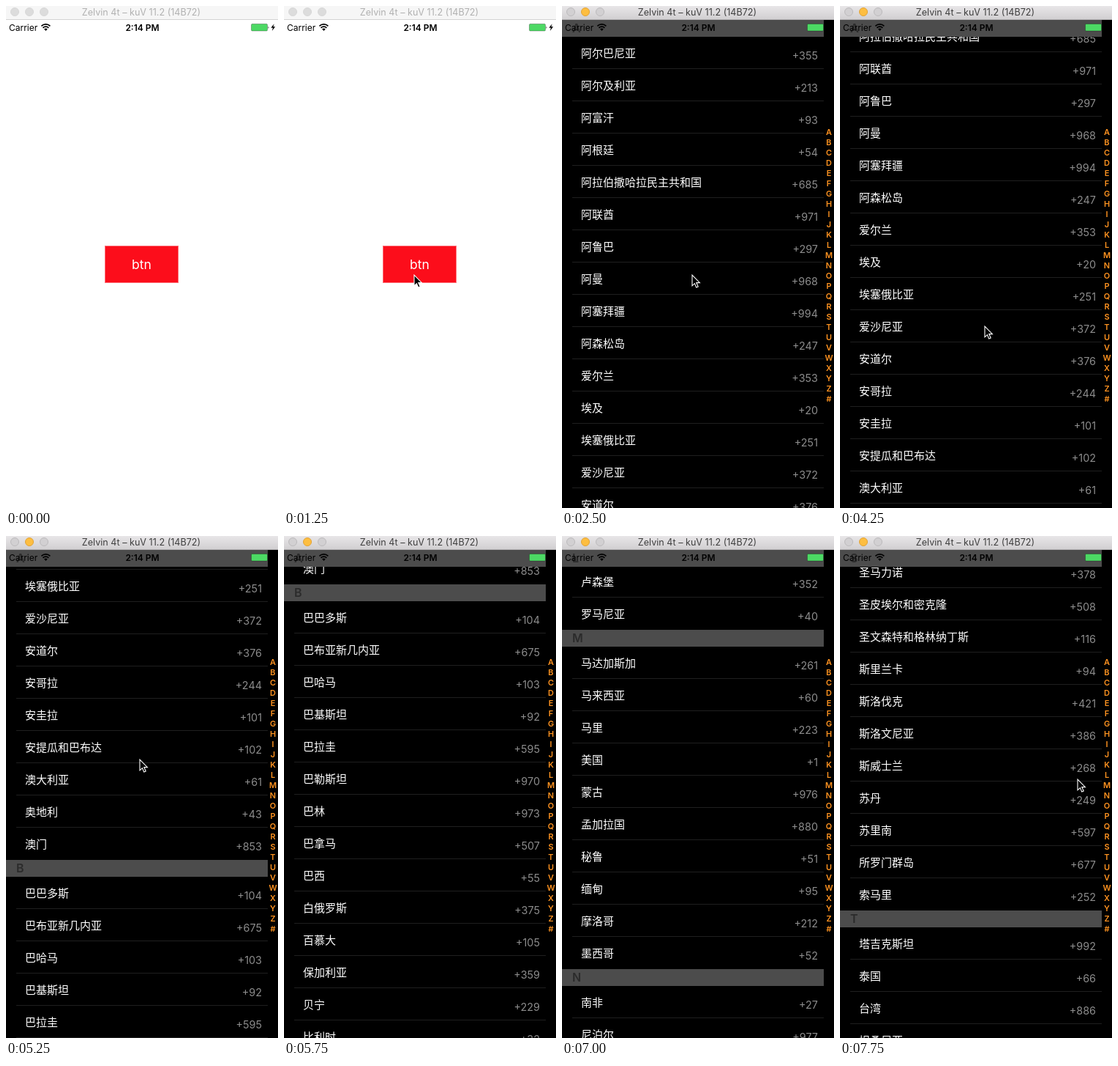
Recreate the animation shown at these times as an HTML page. Size 372 by 685 pixels, loop 8 s.

```html
<!DOCTYPE html>
<html lang="zh-CN">
<head>
<meta charset="utf-8">
<title>Country codes</title>
<style>
  html, body { margin: 0; width: 100%; height: 100%; overflow: hidden; background: #fff; }
  #stage { position: relative; width: 372px; height: 685px; overflow: hidden; background: #fff;
    font-family: Inter, Roboto, sans-serif; }
  #bar { position: absolute; inset: 0 0 auto; height: 18px; background: #f6f6f6; border-bottom: 1px solid #d3d3d3;
    color: #b1b1b1; font-size: 12.6px; line-height: 17px; text-align: center; white-space: nowrap; text-indent: -2px; }
  #bar i { position: absolute; top: 2px; width: 12px; height: 12px; border-radius: 50%; background: #dcdcdc;
    box-sizing: border-box; border: 1px solid #d8d8d8; }
  #bar.on { background: linear-gradient(#e8e6e8, #d1cfd1); border-color: #b2b0b2; color: #3f3f3f; }
  #bar.on i { background: #d2d0d2; border-color: #bcbabc; }
  #bar.on i.min { background: #fdbe41; border-color: #e2a336; }
  #btn { position: absolute; left: 135px; top: 327px; width: 99px; height: 49px; background: #fc0d1b padding-box;
    border: 1px solid #fc0d1b99; color: #fff; font-size: 17.5px; line-height: 49px; text-align: center; }
  #sheet { position: absolute; left: 0; top: 19px; width: 372px; height: 666px; background: #000; }
  #list { position: absolute; inset: 0; overflow: hidden; }
  .head { position: sticky; top: 0; z-index: 1; width: 344px; height: 23px; padding-left: 14px; background: #4c4c4c;
    color: #2b2b2b; font-size: 16px; font-weight: 600; line-height: 23px; }
  .row { position: relative; height: 43px; margin-left: 14px; width: 344px; border-bottom: 1px solid #1f1f1f;
    color: #fff; font: 15px/43px "Noto Sans CJK SC", "Noto Sans CJK", sans-serif; white-space: nowrap; }
  .row span { position: absolute; left: 12px; top: 0; }
  .row b { position: absolute; right: 8px; top: 4px; color: #8c8c8c; font: 14.4px/43px Inter, sans-serif; }
  .section .row:last-child { border-color: #000; }
  #index { position: absolute; left: 358px; top: 146px; width: 14px; color: #ff9320;
    font-size: 11px; font-weight: 600; line-height: 14px; text-align: center; }
  svg { position: absolute; left: 0; top: 0; overflow: visible; }
</style>
</head>
<body>
<div id="stage">
  <div id="btn">btn</div>
  <div id="sheet"><div id="list"></div><div id="index"></div></div>
  <svg width="372" height="42" font-size="12">
    <text x="4" y="33.5">Carrier</text>
    <text x="186.5" y="33.5" font-weight="600" text-anchor="middle">2:14 PM</text>
    <g fill="none" stroke="#000" stroke-width="1.7">
      <path d="M48.4 27.3a8.6 8.6 0 0 1 12 0M50.5 29.8a5.6 5.6 0 0 1 7.8 0"/>
    </g>
    <path d="M54.4 34l-2.3-2.5a3.4 3.4 0 0 1 4.6 0z"/>
    <rect x="335.5" y="24.5" width="22" height="9.5" rx="1.2" fill="#4cd964" stroke="#000" stroke-opacity=".35" stroke-width=".8"/>
    <path d="M358.6 27.4q1.7 1.8 0 3.8z"/>
    <path d="M366.6 24.2l-4.2 5.6h2.6l-1.2 4.2 4.4-5.8h-2.7z"/>
  </svg>
  <div id="bar"><i style="left:6px"></i><i class="min" style="left:26px"></i><i style="left:46px"></i>Zelvin 4t – kuV 11.2 (14B72)</div>
  <svg id="cursor" width="13" height="20">
    <path d="M0 0V14.8L3.4 11.6 5.7 17 8.2 15.9 5.8 10.6H10.4Z" stroke="#fff" stroke-width="1.1"/>
  </svg>
</div>
<script>
const data = `
A 阿尔巴尼亚355 阿尔及利亚213 阿富汗93 阿根廷54 阿拉伯撒哈拉民主共和国685 阿联酋971 阿鲁巴297 阿曼968 阿塞拜疆994 阿森松岛247 爱尔兰353 埃及20 埃塞俄比亚251 爱沙尼亚372 安道尔376 安哥拉244 安圭拉101 安提瓜和巴布达102 澳大利亚61 奥地利43 澳门853
B 巴巴多斯104 巴布亚新几内亚675 巴哈马103 巴基斯坦92 巴拉圭595 巴勒斯坦970 巴林973 巴拿马507 巴西55 白俄罗斯375 百慕大105 保加利亚359 贝宁229 比利时32 冰岛354 波多黎各107 波兰48 波黑387 玻利维亚591 伯利兹501 博茨瓦纳267 不丹975 布基纳法索226 布隆迪257
C 朝鲜850 赤道几内亚240
D 丹麦45 德国49 东帝汶670 多哥228 多米尼加108
E 俄罗斯7 厄瓜多尔593 厄立特里亚291
F 法国33 法属波利尼西亚689 菲律宾63 斐济679 芬兰358 佛得角238
G 冈比亚220 刚果242 格林纳达110 格陵兰299 格鲁吉亚995 哥伦比亚57 哥斯达黎加506 古巴53 瓜德罗普590 关岛671 圭亚那592
H 哈萨克斯坦7 海地509 韩国82 荷兰31 荷属安的列斯599 黑山382 洪都拉斯504
J 吉布提253 加拿大1 加纳233 柬埔寨855 捷克420 津巴布韦263
K 喀麦隆237 卡塔尔974 科威特965 肯尼亚254
L 拉脱维亚371 老挝856 黎巴嫩961 立陶宛370 卢森堡352 罗马尼亚40
M 马达加斯加261 马来西亚60 马里223 美国1 蒙古976 孟加拉国880 秘鲁51 缅甸95 摩洛哥212 墨西哥52
N 南非27 尼泊尔977 尼日利亚234 挪威47
P 葡萄牙351
R 日本81 瑞典46 瑞士41
S 塞尔维亚381 塞内加尔221 塞浦路斯357 沙特阿拉伯966 圣卢西亚109 圣马力诺378 圣皮埃尔和密克隆508 圣文森特和格林纳丁斯116 斯里兰卡94 斯洛伐克421 斯洛文尼亚386 斯威士兰268 苏丹249 苏里南597 所罗门群岛677 索马里252
T 塔吉克斯坦992 泰国66 台湾886 坦桑尼亚255 汤加676`;

const $ = id => document.getElementById(id);
const LOOP = 8000, STEP = 250, HEAD = 23, ROW = 44;

// Build the sections and remember where each row starts.
const rowTop = {};
let y = 0;
$('list').innerHTML = data.trim().split('\n').map(line => {
  const [letter, ...items] = line.split(' ');
  y += HEAD;
  const rows = items.map(item => {
    const [, name, code] = item.match(/(\D+)(\d+)/);
    rowTop[name] = y;
    y += ROW;
    return `<div class="row"><span>${name}</span><b>+${code}</b></div>`;
  });
  return `<div class="section"><div class="head">${letter}</div>${rows.join('')}</div>`;
}).join('');
$('index').innerHTML = [...'ABCDEFGHIJKLMNOPQRSTUVWXYZ#'].join('<br>');

const midG = rowTop['格陵兰'] - 10, midS = rowTop['圣马力诺'] - 8;
const between = k => midG + (midS - midG) * k;

const rise = [[1750, 666], [2000, 577], [2250, 60], [2500, 0]];
const scroll = [[3000, 0], [4250, 199], [4750, 331], [5250, 524], [5500, 575], [5750, 900],
  [6250, midG], [6750, between(.25)], [7250, between(.8)], [7500, midS - 110], [7750, midS]];
const cursorX = [[250, 188], [1000, 175], [1250, 178], [2500, 178], [3000, 198], [4250, 198], [4750, 183],
  [5500, 183], [7000, 358], [7250, 358], [7750, 325]];
const cursorY = [[250, 173], [1000, 355], [1250, 367], [2500, 367], [3000, 635], [4250, 437], [4750, 305],
  [5250, 305], [5500, 420], [7000, 3], [7250, 3], [7750, 332]];

// Linear value of a [time, value] track.
function at(track, t) {
  const i = track.findIndex(key => key[0] >= t);
  if (i < 0) return track[track.length - 1][1];
  if (i === 0) return track[0][1];
  const [t0, v0] = track[i - 1], [t1, v1] = track[i];
  return v0 + (v1 - v0) * (t - t0) / (t1 - t0);
}

function draw() {
  const t = Math.floor(performance.now() % LOOP / STEP) * STEP;
  $('bar').className = t >= 1500 ? 'on' : '';
  $('sheet').style.transform = `translateY(${at(rise, t)}px)`;
  $('list').scrollTop = Math.round(at(scroll, t));
  const shown = t >= 250 && t <= 5500 || t >= 7250;
  $('cursor').style.visibility = shown ? 'visible' : 'hidden';
  $('cursor').style.transform = `translate(${at(cursorX, t)}px, ${at(cursorY, t)}px)`;
  requestAnimationFrame(draw);
}
draw();
</script>
</body>
</html>
```
